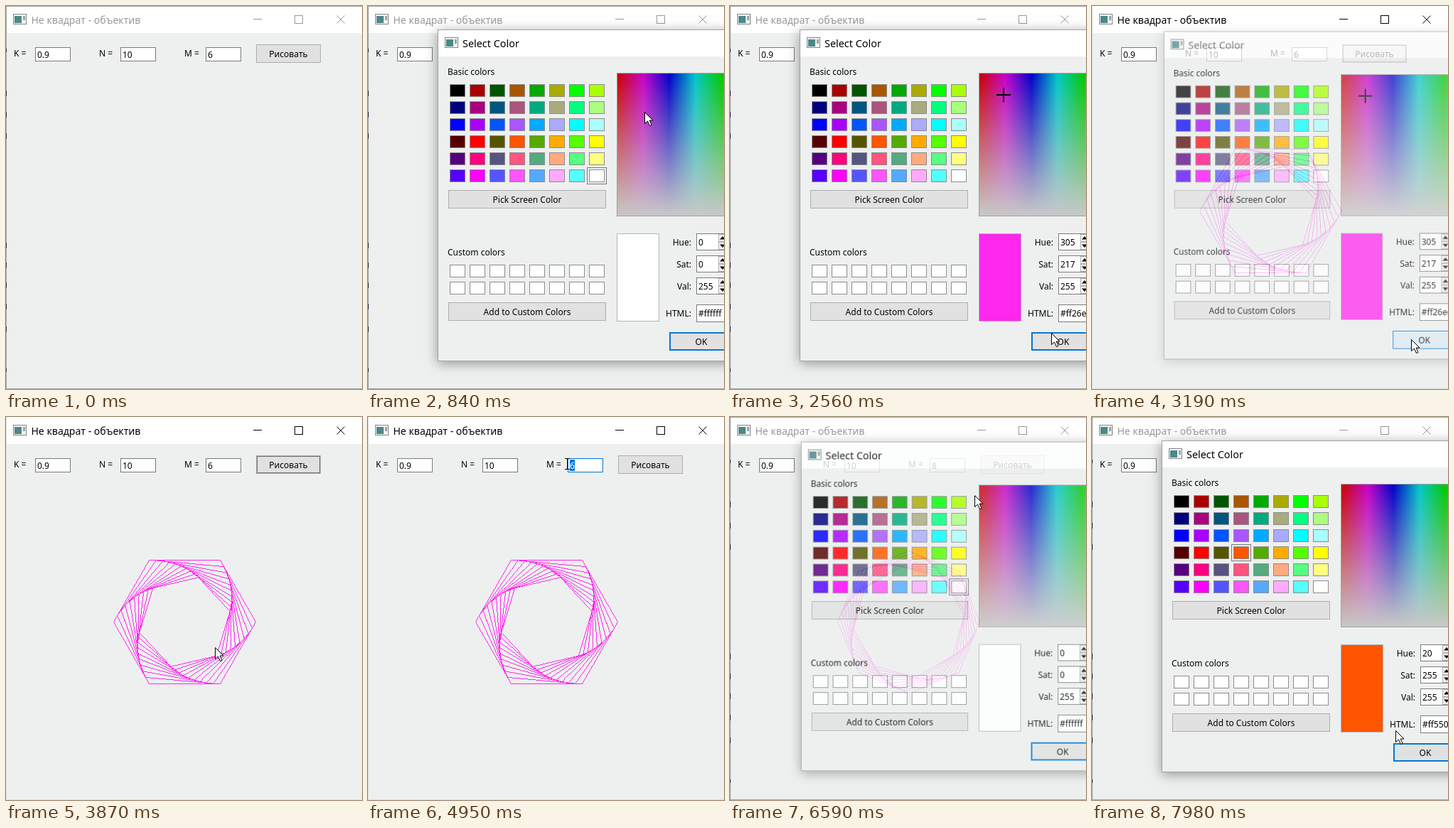
Animation of 501x539 px, one loop 8 s. Source, as an HTML page with a canvas:

```html
<!DOCTYPE html>
<html lang="ru">
<head>
<meta charset="utf-8">
<style>
html, body { margin: 0; width: 100%; height: 100%; overflow: hidden; background: #eef0f0; }
canvas { display: block; }
</style>
</head>
<body>
<canvas id="stage" width="501" height="539"></canvas>
<script>
const LOOP = 8000, FACE = '#eef0f0', BLUE = '#0078d7', PINK = '#ff26ed';
const FONT = '"Noto Sans", "Open Sans", sans-serif';
const stage = document.getElementById('stage').getContext('2d');
const layer = Object.assign(document.createElement('canvas'), { width: 640, height: 539 });
const dialog = layer.getContext('2d');
let ctx = stage;

// Moments of the story
const OPEN_1 = 70, PICK_1 = 1800, CLOSE_1 = 3060, FOCUS_M = 4450, SELECT_M = 4650,
      TYPE_M = 5420, HOVER = 6160, PRESS = 6290, OPEN_2 = 6440, PICK_2 = 7600;
const CLICKS = [[1780, 1980], [2840, 3000], [4420, 4800], [PRESS, 6440], [7530, 7720]];

// Pointer: time, x, y
const PATH = [
  [70, 380, 74], [400, 346, 111], [800, 390, 150], [1400, 402, 161], [1560, 400, 160],
  [1770, 384, 126], [2050, 384, 126], [2560, 453, 461], [2800, 450, 470], [3250, 450, 470],
  [3480, 362, 519], [3870, 295, 325], [4250, 300, 86], [4400, 292, 66], [4500, 292, 66],
  [4700, 280, 66], [5880, 280, 66], [6200, 379, 69], [6440, 379, 69], [6580, 345, 111],
  [6680, 345, 111], [7500, 197, 194], [7680, 197, 194], [7980, 428, 442]
];

const clamp = v => Math.max(0, Math.min(1, v));
const within = (t, a, b) => t >= a && t < b;

function pointerAt(t) {
  let i = PATH.findIndex(p => p[0] > t);
  if (i < 0) return PATH[PATH.length - 1].slice(1);
  if (i === 0) return PATH[0].slice(1);
  const [t0, x0, y0] = PATH[i - 1], [t1, x1, y1] = PATH[i];
  const p = (t - t0) / (t1 - t0), e = p * p * (3 - 2 * p);
  return [Math.round(x0 + (x1 - x0) * e), Math.round(y0 + (y1 - y0) * e)];
}

function dialogAlpha(t) {
  const fadeIn = start => 1 - (1 - clamp((t - start) / 260)) ** 2;
  if (t < CLOSE_1) return fadeIn(OPEN_1);
  if (t < OPEN_2) return 1 - clamp((t - CLOSE_1) / 250) ** 2;
  return fadeIn(OPEN_2);
}

function fill(color, x, y, w, h) {
  ctx.fillStyle = color;
  ctx.fillRect(x, y, w, h);
}
function box(x, y, w, h, back, border, width = 1) {
  fill(border, x, y, w, h);
  fill(back, x + width, y + width, w - 2 * width, h - 2 * width);
}
function text(str, x, y, { size = 12, color = '#000', align = 'left' } = {}) {
  ctx.font = `${size}px ${FONT}`;
  ctx.fillStyle = color;
  ctx.textAlign = align;
  ctx.fillText(str, x, y);
}
function dotted(x, y, w, h) {
  ctx.strokeStyle = '#000';
  ctx.lineWidth = 1;
  ctx.setLineDash([1, 1]);
  ctx.strokeRect(x + .5, y + .5, w - 1, h - 1);
  ctx.setLineDash([]);
}
function button(label, x, y, w, h, back = '#e1e1e1', border = '#adadad', width = 1) {
  box(x, y, w, h, back, border, width);
  text(label, x + w / 2, y + h / 2 + 5, { align: 'center' });
}
function appIcon(x, y) {
  box(x, y, 19, 15, '#f4f6f6', '#7f8688');
  const g = ctx.createLinearGradient(x, y, x + 12, y + 13);
  g.addColorStop(0, '#4f7f9c');
  g.addColorStop(1, '#4a8d7c');
  fill(g, x + 2, y + 3, 10, 10);
  fill('#9aa3a6', x + 14, y + 3, 3, 6);
}

// Crisp one-pixel lines of the nested polygons
function nestedPolygons(sides, count, k) {
  const path = new Path2D();
  let pts = Array.from({ length: sides }, (_, i) => {
    const a = 2 * Math.PI * i / sides;
    return [251 + 100 * Math.cos(a), 288 + 100 * Math.sin(a)];
  });
  for (let n = 0; n < count; n++) {
    const next = pts.map((_, i) => pts[(i + 1) % sides]);
    pts.forEach(([x, y], i) => {
      const dx = next[i][0] - x, dy = next[i][1] - y;
      const steps = Math.ceil(Math.max(Math.abs(dx), Math.abs(dy)));
      for (let s = 0; s < steps; s++)
        path.rect(Math.round(x + dx * s / steps), Math.round(y + dy * s / steps), 1, 1);
    });
    pts = pts.map(([x, y], i) => [x * k + next[i][0] * (1 - k), y * k + next[i][1] * (1 - k)]);
  }
  return path;
}
const hexagon = nestedPolygons(6, 10, .9), octagon = nestedPolygons(8, 10, .9);

function field(label, value, x, focused) {
  text(label + ' =', x, 71);
  box(x + 30, 58, 50, 20, '#fff', focused ? BLUE : '#7a7a7a');
  text(value, x + 33, 73);
}

function drawWindow(t) {
  const active = within(t, CLOSE_1, OPEN_2), ink = active ? '#000' : '#999';
  fill(FACE, 0, 0, 501, 539);
  fill('#fff', 0, 0, 501, 38);
  const edge = active ? '#e2e4e4' : '#a6a6a6';
  fill(edge, 0, 0, 1, 539);
  fill(edge, 0, 538, 501, 1);
  if (!active) {
    fill(edge, 0, 0, 501, 1);
    for (const y of [60, 119, 149, 179, 333, 361, 389, 419, 451, 510]) fill('#3a2a50', 0, y, 1, y % 2 ? 8 : 5);
  }
  appIcon(10, 11);
  text('Не квадрат - объектив', 35.5, 25, { size: 14, color: ink });
  ctx.strokeStyle = ink;
  ctx.lineWidth = 1;
  ctx.strokeRect(406.5, 13.5, 11, 11);
  ctx.beginPath();
  ctx.moveTo(348, 18.5); ctx.lineTo(360, 18.5);
  ctx.moveTo(465.5, 13.5); ctx.lineTo(476.5, 24.5);
  ctx.moveTo(476.5, 13.5); ctx.lineTo(465.5, 24.5);
  ctx.stroke();

  const typed = t >= TYPE_M;
  field('K', '0.9', 11);
  field('N', '10', 131);
  field('M', typed ? '8' : '6', 251, within(t, FOCUS_M, PRESS));
  if (within(t, SELECT_M, TYPE_M)) {
    fill(BLUE, 284, 60, 7, 16);
    text('6', 284, 73, { color: '#fff' });
  }
  if (within(t, TYPE_M, 5950)) fill('#000', 291, 61, 1, 14);

  const pressed = within(t, PRESS, OPEN_2);
  if (pressed) button('Рисовать', 352, 54, 91, 26, '#d9e9f4', '#005499');
  else if (within(t, HOVER, PRESS)) button('Рисовать', 352, 54, 91, 26, '#e5f1fb', BLUE);
  else button('Рисовать', 352, 54, 91, 26);
  if (pressed || within(t, CLOSE_1, FOCUS_M)) dotted(353, 55, 89, 24);

  if (t >= CLOSE_1) {
    ctx.fillStyle = PINK;
    ctx.fill(t < OPEN_2 ? hexagon : octagon);
  }
}

function spinBox(label, value, y) {
  text(label, 455, y + 17, { align: 'right' });
  box(462, y, 50, 24, '#fff', '#7a7a7a');
  text(value, 465, y + 17);
  for (const dir of [-1, 1]) {
    const cy = y + 12 + dir * 5.5;
    box(493, dir < 0 ? y + 1 : y + 12, 18, 11, '#f0f0f0', '#b4b4b4');
    ctx.fillStyle = '#111';
    ctx.beginPath();
    ctx.moveTo(495, cy - dir * 2); ctx.lineTo(503, cy - dir * 2); ctx.lineTo(499, cy + dir * 2.5);
    ctx.fill();
  }
}

function drawSpectrum(hue, sat) {
  box(350, 94, 222, 202, '#c8c8c8', '#a0a0a0');
  const hues = ctx.createLinearGradient(351, 0, 571, 0);
  ['#c80000', '#c800c8', '#0000c8', '#00c8c8', '#00c800', '#c8c800', '#c80000']
    .forEach((c, i) => hues.addColorStop(i / 6, c));
  fill(hues, 351, 95, 220, 200);
  const gray = ctx.createLinearGradient(0, 95, 0, 295);
  gray.addColorStop(0, 'rgba(200,200,200,0)');
  gray.addColorStop(1, 'rgb(200,200,200)');
  fill(gray, 351, 95, 220, 200);
  const x = Math.round(350 + (360 - hue) / 360 * 220), y = Math.round(94 + (255 - sat) / 255 * 200);
  fill('#000', x - 9, y, 20, 2);
  fill('#000', x, y - 9, 2, 20);
}

function drawDialog(t) {
  const closing = within(t, CLOSE_1, OPEN_2);
  const [color, hue, sat, chosen] =
    within(t, PICK_1, OPEN_2) ? [PINK, 305, 217, -1] :
    t >= PICK_2 ? ['#ff5500', 20, 255, 21] : ['#ffffff', 0, 0, 47];
  ctx.clearRect(0, 0, 640, 539);
  ctx.shadowColor = `rgba(0,0,0,${closing ? .2 : .38})`;
  ctx.shadowBlur = 16;
  ctx.shadowOffsetY = 3;
  fill('#a2a4a4', 98, 33, 504, 467);
  ctx.shadowColor = 'transparent';
  fill(FACE, 99, 34, 502, 465);
  fill('#fff', 99, 34, 502, 37);
  appIcon(108, 44);
  text('Select Color', 133, 58, { size: 14.4, color: closing ? '#555' : '#000' });

  text('Basic colors', 112, 97);
  for (let i = 0; i < 48; i++) {
    const x = 115 + 28 * Math.floor(i / 6), y = 110 + 24 * (i % 6);
    const rgb = [Math.floor(i / 3) % 4 * 85, Math.floor(i / 12) * 85, Math.floor(i % 3 * 127.5)];
    box(x, y, 22, 18, `rgb(${rgb})`, '#8c8c8c');
    if (i === chosen) dotted(x - 3, y - 3, 28, 24);
  }
  button('Pick Screen Color', 113, 259, 222, 26);
  text('Custom colors', 112, 351);
  for (let i = 0; i < 16; i++)
    box(115 + 28 * (i % 8), i < 8 ? 364 : 388, 22, 18, '#fff', '#8c8c8c');
  button('Add to Custom Colors', 113, 417, 222, 26);

  drawSpectrum(hue, sat);
  box(350, 320, 60, 124, color, '#b4b4b4');
  spinBox('Hue:', hue, 320);
  spinBox('Sat:', sat, 351);
  spinBox('Val:', 255, 382);
  text('HTML:', 455, 437, { align: 'right' });
  box(462, 420, 120, 25, '#fff', '#7a7a7a');
  text(color, 465, 437);
  if (within(t, 2640, OPEN_2)) button('OK', 424, 459, 90, 26, '#dcebf6', BLUE);
  else button('OK', 424, 459, 90, 26, '#e1e1e1', BLUE, 2);
}

function drawPointer(t) {
  if (t < OPEN_1) return;
  const [x, y] = pointerAt(t);
  if (CLICKS.some(([a, b]) => within(t, a, b))) {
    ctx.fillStyle = 'rgba(236,234,50,.7)';
    ctx.beginPath();
    ctx.arc(x - .5, y, 15, 0, 7);
    ctx.fill();
  }
  if (within(t, 4300, 6100) && x < 331 && y > 57 && y < 79) {
    fill('#000', x, y - 8, 1, 16);
    for (const end of [y - 8, y + 7]) fill('#000', x - 3, end, 7, 1);
    return;
  }
  ctx.save();
  ctx.translate(x - .5, y - .5);
  ctx.beginPath();
  for (const [px, py] of [[0, 0], [0, 16], [4, 12.5], [7, 19], [9.5, 18], [6.7, 11.5], [11.5, 11.5]]) ctx.lineTo(px, py);
  ctx.closePath();
  ctx.fillStyle = '#fff';
  ctx.strokeStyle = '#000';
  ctx.lineWidth = 1;
  ctx.fill();
  ctx.stroke();
  ctx.restore();
}

function frame() {
  const t = performance.now() % LOOP, alpha = dialogAlpha(t);
  ctx = stage;
  drawWindow(t);
  if (alpha > 0) {
    ctx = dialog;
    drawDialog(t);
    ctx = stage;
    const scale = .96 + .04 * alpha;
    ctx.save();
    ctx.globalAlpha = alpha;
    ctx.translate(350, 267);
    ctx.scale(scale, scale);
    ctx.drawImage(layer, -350, -267);
    ctx.restore();
  }
  drawPointer(t);
  requestAnimationFrame(frame);
}
frame();
</script>
</body>
</html>
```
